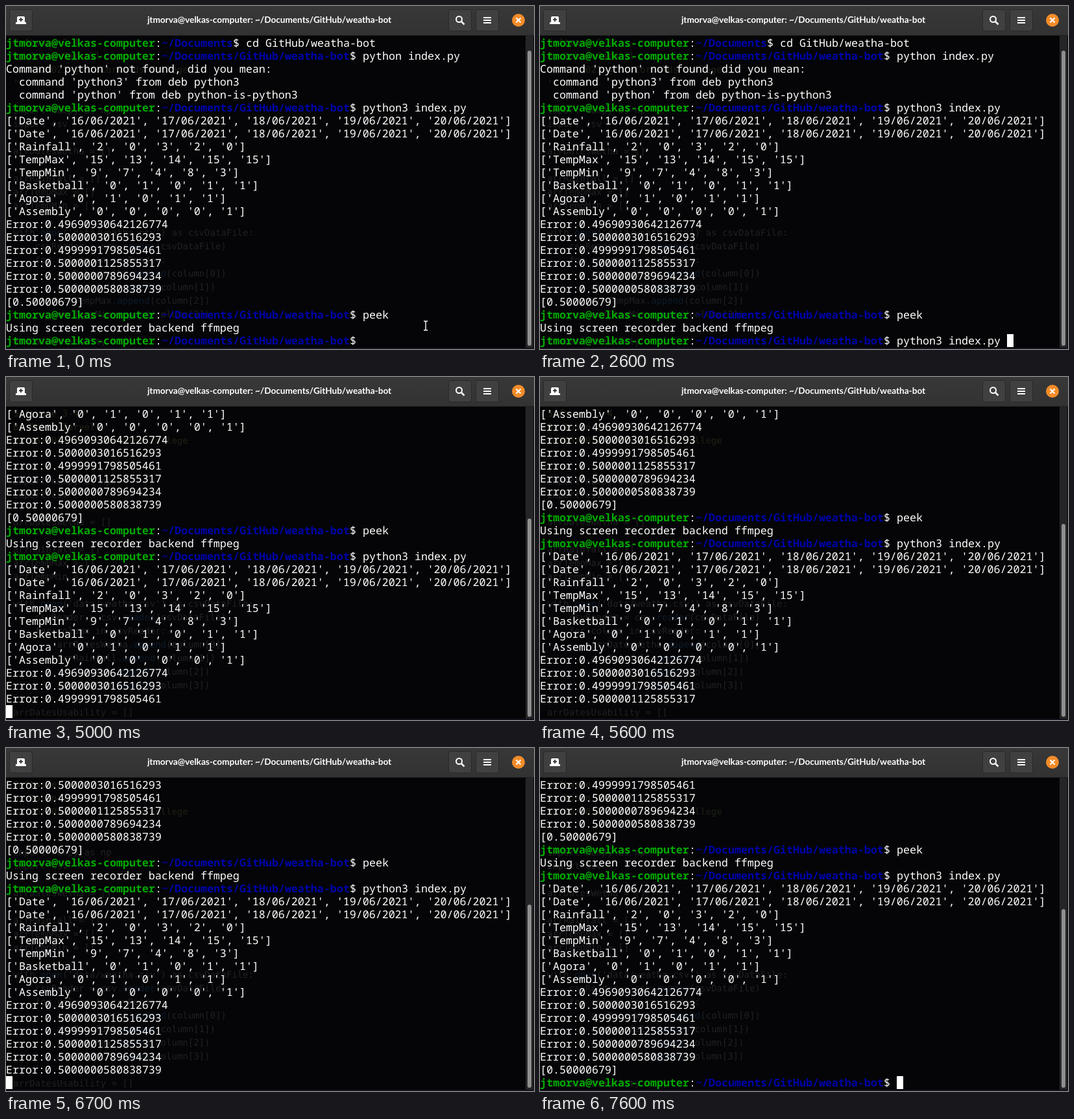
Write an HTML page that moves like this. It is 814 px wide and 530 px high and loops after 8 s.

```html
<!DOCTYPE html>
<html lang="en">
<head>
<meta charset="utf-8">
<title>Terminal</title>
<style>
  html, body { margin: 0; width: 100%; height: 100%; overflow: hidden; background: #050507; }
  svg { display: block; width: 814px; height: 530px; }
  text { white-space: pre; text-rendering: geometricPrecision; font-variant-ligatures: none; }
  #title { font: 700 13.6px Lato, sans-serif; fill: #fff; text-anchor: middle; }
  #lines { font: 16.667px "Noto Sans Mono", monospace; fill: #fff; }
  #lines .user { font-weight: 700; fill: #00aa00; }
  #lines .path { font-weight: 700; fill: #0000aa; }
  #ghost { font: 14px "DejaVu Sans Mono", monospace; fill: #202122; }
  #ghost .note { fill: #1c2214; }
  #ghost .call { fill: #0e1b29; }
  .button { fill: #404040; stroke: #292929; }
</style>
</head>
<body>
<svg viewBox="0 0 814 530">
  <defs>
    <linearGradient id="bar" x2="0" y2="1">
      <stop offset="0" stop-color="#383838"/>
      <stop offset="1" stop-color="#323232"/>
    </linearGradient>
    <clipPath id="screen"><rect y="46" width="801" height="481"/></clipPath>
  </defs>
  <rect width="814" height="530" fill="#050507"/>
  <g clip-path="url(#screen)">
    <g id="ghost"></g>
    <g id="lines"></g>
    <rect id="cursor" y="507" width="10" height="20" fill="#fff"/>
  </g>
  <path id="pointer" d="M644 487h2l1 1 1-1h2M647 488v12M644 501h2l1-1 1 1h2" fill="none" stroke="#fff" stroke-width="1.4"/>

  <rect x="801" y="46" width="12" height="482" fill="#252527"/>
  <rect id="thumb" x="804" width="6" rx="3" fill="#8f8f8f"/>
  <rect y="528" width="814" height="2" fill="#10111a"/>

  <rect width="814" height="45" fill="url(#bar)"/>
  <rect y="45" width="814" height="1" fill="#1e1e1e"/>
  <rect class="button" x="5.5" y="5.5" width="35" height="33" rx="3"/>
  <rect class="button" x="682.5" y="5.5" width="35" height="33" rx="3"/>
  <rect class="button" x="724.5" y="5.5" width="35" height="33" rx="3"/>
  <path d="M17 18q0-2 2-2h8q2 0 2 2v7h2v3H15v-3h2z" fill="#fff"/>
  <path d="M23 18v6M20 21h6" stroke="#404040" stroke-width="2"/>
  <g fill="none" stroke="#fff" stroke-width="2">
    <circle cx="698.5" cy="20.5" r="4.5"/>
    <path d="M701.5 23.5l5 5" stroke-width="2.5"/>
    <path d="M736 18h12M736 22h12M736 26h12"/>
  </g>
  <circle cx="790" cy="22" r="10" fill="#f28c2a"/>
  <path d="M786.5 18.5l7 7M793.5 18.5l-7 7" stroke="#fff" stroke-width="2"/>
  <text id="title" x="406" y="26"></text>
</svg>
<script>
const CELL = 10, ROW = 20, TOP = 47, LAST_ROW = 23, INPUT_LINE = 23, LOOP = 8000;
const USER = 'jtmorva@velkas-computer';
const HOME = '~/Documents', REPO = HOME + '/GitHub/weatha-bot';
const RUN = 'python3 index.py ';
const $ = id => document.getElementById(id);

function add(parent, tag, attrs, content = '') {
  const node = document.createElementNS('http://www.w3.org/2000/svg', tag);
  for (const key in attrs) node.setAttribute(key, attrs[key]);
  node.textContent = content;
  return parent.appendChild(node);
}

// Terminal contents
const prompt = (command, path = REPO) => ({ command, path });
const list = (name, values) => `['${name}', ${values.split(' ').map(v => `'${v}'`).join(', ')}]`;
const dates = list('Date', [16, 17, 18, 19, 20].map(d => d + '/06/2021').join(' '));
const output = [
  dates, dates,
  list('Rainfall', '2 0 3 2 0'),
  list('TempMax', '15 13 14 15 15'),
  list('TempMin', '9 7 4 8 3'),
  list('Basketball', '0 1 0 1 1'),
  list('Agora', '0 1 0 1 1'),
  list('Assembly', '0 0 0 0 1'),
  ...['0.49690930642126774', '0.5000003016516293', '0.4999991798505461',
    '0.5000001125855317', '0.5000000789694234', '0.5000000580838739'].map(e => 'Error:' + e),
  '[0.50000679]'
];
const content = [
  prompt('cd GitHub/weatha-bot', HOME),
  prompt('python index.py'),
  "Command 'python' not found, did you mean:",
  "  command 'python3' from deb python3",
  "  command 'python' from deb python-is-python3",
  prompt(RUN), ...output,
  prompt('peek'),
  'Using screen recorder backend ffmpeg',
  prompt(''), ...output,
  prompt('')
];

let input;
const lines = content.map((line, i) => {
  const y = TOP + i * ROW + 16;
  if (typeof line === 'string') return add($('lines'), 'text', { x: 0, y }, line);
  const node = add($('lines'), 'text', { y });
  let col = 0;
  const part = (text, kind) => {
    const span = add(node, 'tspan', { x: col * CELL, class: kind }, text);
    col += text.length;
    return span;
  };
  part(USER, 'user');
  part(':', 'plain');
  part(line.path, 'path');
  part('$ ', 'plain');
  const command = part(line.command, 'plain');
  if (i === INPUT_LINE) input = command;
  return node;
});

// Editor window faintly showing through
const append = (name, i) => `        ${name}|.append|(column[${i}])`;
[
  '#Software 3-4', '#By Robin Tarvell', '#14/06/2021 @ St Corvalds College', "#'''", '',
  'import numpy as np', 'import csv', '',
  'arrDatesWetha = []', '', 'arrRainfall = []', 'arrTempMax = []', 'arrTempMin = []', '',
  "with |open|('data/weatha.csv') as csvDataFile:",
  '    csvReader = csv|.reader|(csvDataFile)',
  '    for column in csvReader:',
  ...['arrDatesWetha', 'arrRainfall', 'arrTempMax', 'arrTempMin'].map(append), '',
  'arrDatesUsability = []'
].forEach((line, i) => {
  const note = line[0] === '#';
  const node = add($('ghost'), 'text', { x: 11, y: 61 + i * 21, class: note ? 'note' : '' });
  (note ? line.slice(1) : line).split('|').forEach((text, k) =>
    add(node, 'tspan', k % 2 ? { class: 'call' } : {}, text));
});

$('title').textContent = `${USER}: ${REPO}`;

// ms, scrolled rows, cursor column (-1 hides it), typed command, scrollbar rows if ahead
const steps = [
  [0, 0, -1, ''],
  [900, 0, 59, 'peek'],
  [1300, 0, -1, 'peek'],
  [1600, 0, 72, RUN],
  [2200, 0, -1, RUN],
  [2600, 0, 72, RUN],
  [4000, 11, 0, RUN],
  [4400, 12, -1, RUN],
  [5000, 12, 0, RUN],
  [5100, 13, 0, RUN],
  [5600, 13, -1, RUN],
  [5900, 14, -1, RUN],
  [6200, 14, 0, RUN],
  [6700, 15, 0, RUN],
  [6800, 15, -1, RUN],
  [7300, 15, -1, RUN, 16],
  [7400, 16, 0, RUN],
  [7600, 16, 55, RUN]
];

function show(t) {
  const [, scroll, column, command, bar = scroll] = steps.filter(s => s[0] <= t).pop();
  const atPrompt = t < 4000 || t >= 7600;
  const end = scroll + LAST_ROW + (atPrompt ? 1 : 0);
  lines.forEach((line, i) => line.style.display = i >= scroll && i < end ? '' : 'none');
  $('lines').setAttribute('transform', `translate(0 ${-scroll * ROW})`);
  if (input.textContent !== command) input.textContent = command;
  $('cursor').setAttribute('x', column * CELL);
  $('pointer').style.display = t < 700 ? '' : 'none';
  const top = 49.8 + 480.7 * (bar + 1) / (bar + 25);
  $('thumb').setAttribute('y', top);
  $('thumb').setAttribute('height', 525 - top);
}

const start = performance.now();
function tick() {
  show((performance.now() - start) % LOOP);
  requestAnimationFrame(tick);
}
tick();
</script>
</body>
</html>
```
